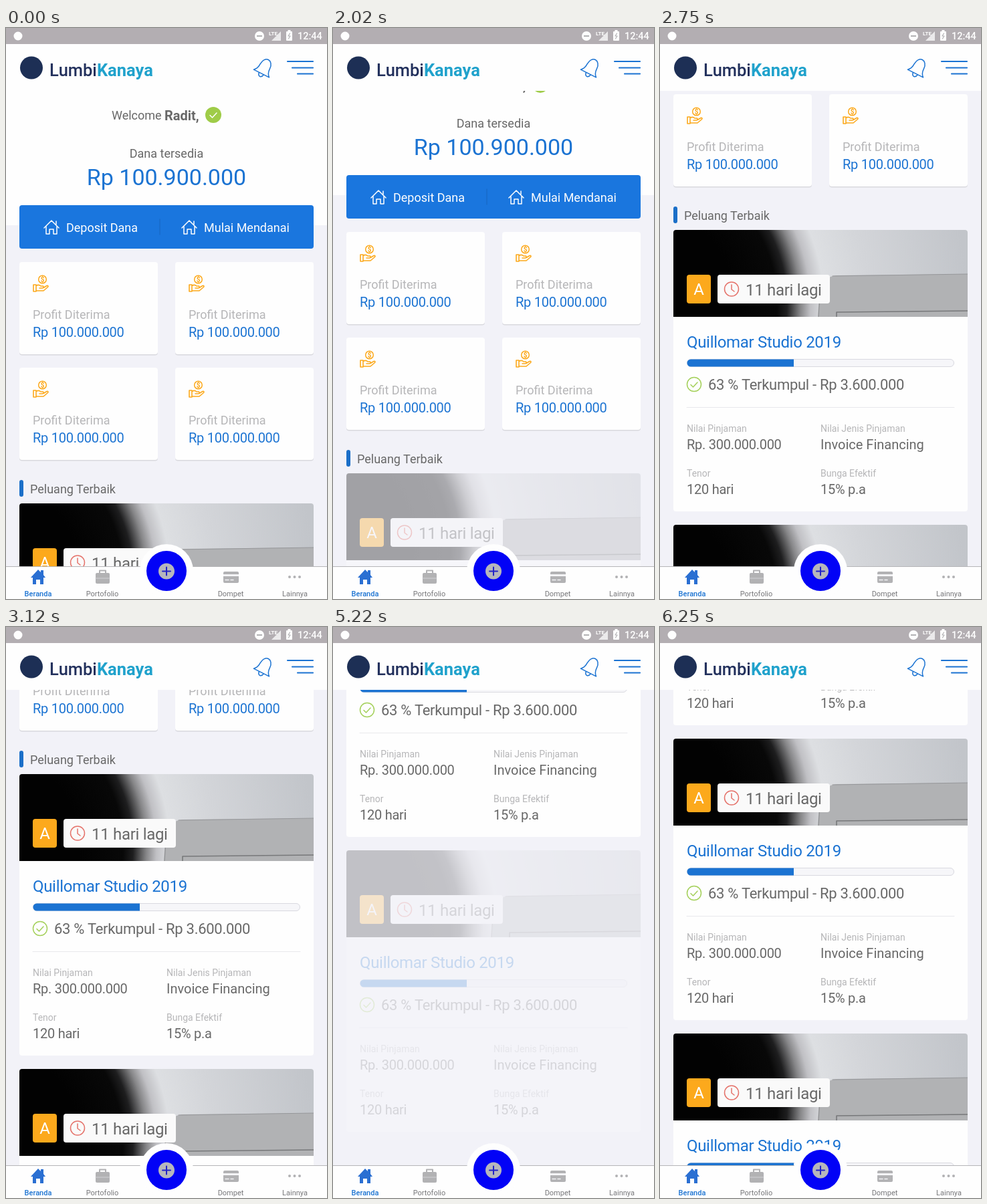
An HTML page that plays this animation: 480 by 854 pixels, repeating every 8 s.

```html
<!DOCTYPE html>
<html lang="id">
<head>
<meta charset="utf-8">
<title>Beranda</title>
<style>
  html, body { margin: 0; width: 100%; height: 100%; overflow: hidden; background: #fff; }
  svg { display: block; width: 480px; height: 854px; font-family: Roboto, sans-serif; }
  .num { letter-spacing: -.013em; }
</style>
</head>
<body>
<svg id="stage" viewBox="0 0 480 854" xmlns="http://www.w3.org/2000/svg"></svg>
<script>
const BLUE = '#1b73d2', INK = '#686868', PALE = '#b6b6b8', PAPER = '#fefefe',
      PAGE = '#f2f2f8', AMBER = '#fca91c', GREY = '#b2b2b4', GREEN = '#a4d05a';
const LOOP = 8000, PITCH = 441;

// Drawing helpers
const text = (x, y, size, fill, str, extra = '') =>
  `<text x="${x}" y="${y}" font-size="${size}" fill="${fill}" ${extra}>${str}</text>`;
const rect = (x, y, w, h, fill, r = 0, extra = '') =>
  `<rect x="${x}" y="${y}" width="${w}" height="${h}" rx="${r}" fill="${fill}" ${extra}/>`;
const disc = (x, y, r, fill) => `<circle cx="${x}" cy="${y}" r="${r}" fill="${fill}"/>`;
const line = (d, stroke, w = 1.5) =>
  `<path d="${d}" fill="none" stroke="${stroke}" stroke-width="${w}" stroke-linecap="round" stroke-linejoin="round"/>`;
const at = (x, y, body, extra = '') => `<g transform="translate(${x} ${y}) ${extra}">${body}</g>`;
const ring = (x, y, r, stroke) => `<circle cx="${x}" cy="${y}" r="${r}" fill="none" stroke="${stroke}" stroke-width="1.5"/>`;
const MID = 'text-anchor="middle"', NUM = 'class="num"';

const house = (x, y) => at(x, y, line('M-11 1L0-10 11 1M-8-1V10H-3V3H3V10H8V-1M7-4V-9', PAPER));

const handCoin = at(20, 20,
  ring(14.5, 6, 5.8, AMBER) +
  text(14.5, 9.6, 10, AMBER, '$', MID + ' font-weight="700"') +
  line('M1 14H5V24H1ZM5 15.5Q9 13 12 16H15.5Q17 18 14.5 19H10M16 18.5L21 15.5Q24 15 22.5 17.5L16 23H5', AMBER, 1.6));

const profitCard = (x, y) => at(x, y,
  rect(0, 1.5, 207, 138, '#d9d9de', 4) + rect(0, 0, 207, 138, PAPER, 4) + handCoin +
  text(20, 85, 18, PALE, 'Profit Diterima') +
  text(20, 112, 20, BLUE, 'Rp 100.000.000', NUM));

const photo = `<g clip-path="url(#photoClip)">
  ${rect(20, 0, 440, 130, 'url(#glow)')}
  <path d="M236 130L239 82Q250 69 264 68L460 66V130Z" fill="#b1b2b4"/>
  ${line('M258 69L460 66', '#96979a', 1)}
  ${line('M264 130V123L460 121', '#77787a', 1.6)}
  ${line('M237 130L239 100', '#8b8c8e', 1)}</g>`;

const field = (x, y, label, value, extra) =>
  text(x, y, 14, PALE, label) + text(x, y + 26, 20, INK, value, extra);

const loanCard = i => `<g class="loan" transform="translate(0 ${711 + PITCH * i})">
  ${rect(20, 0, 440, 421, PAPER, 4)}${photo}
  ${rect(40, 67, 36, 43, AMBER, 4)}${text(58, 97, 24, PAPER, 'A', MID)}
  ${rect(86, 67, 168, 43, '#fafafa', 4)}${ring(107, 88.5, 10.5, '#e5736b')}${line('M107 82V89L111 92', '#e5736b')}
  ${text(128, 98, 24, INK, '11 hari lagi', NUM)}
  ${text(40, 176, 24, BLUE, 'Quillomar Studio 2019', NUM)}
  ${rect(40.5, 193.5, 399, 11, '#f6f6f9', 5.5, 'stroke="#d9d9e0"')}
  <path d="M200 193.5H46a5.5 5.5 0 0 0 0 11H200Z" fill="${BLUE}"/>
  ${ring(51, 231, 10.5, GREEN)}${line('M46 231.5L49.5 235 56 228', GREEN)}
  ${text(72, 239, 22, INK, '63 % Terkumpul - Rp 3.600.000', NUM)}
  ${line('M40 265.5H440', '#e8e8ec', 1)}
  ${field(40, 302, 'Nilai Pinjaman', 'Rp. 300.000.000', NUM)}
  ${field(240, 302, 'Nilai Jenis Pinjaman', 'Invoice Financing')}
  ${field(40, 369, 'Tenor', '120 hari', NUM)}
  ${field(240, 369, 'Bunga Efektif', '15% p.a', NUM)}</g>`;

const content =
  rect(0, 0, 480, 295, PAPER) +
  text(158, 137, 18, INK, 'Welcome') +
  text(237, 138, 20, INK, 'Radit,', 'font-weight="700"') +
  disc(310, 130, 12, '#9fcc48') + line('M305 130.5L308.5 134 315 127', PAPER) +
  text(240, 194, 18, INK, 'Dana tersedia', MID) +
  text(240, 235, 34, BLUE, 'Rp 100.900.000', MID) +
  rect(20, 265, 440, 65, '#1a76de', 4) + line('M230 286V309', '#1764bf', 1) +
  house(68, 298) + text(90, 305, 18, PAPER, 'Deposit Dana') +
  house(274, 298) + text(296, 305, 18, PAPER, 'Mulai Mendanai') +
  [350, 508].map(y => profitCard(20, y) + profitCard(253, y)).join('') +
  rect(20, 676, 6, 25, '#1b6fc8', 3) + text(36, 696, 18, INK, 'Peluang Terbaik') +
  [0, 1, 2].map(loanCard).join('');

const statusBar = rect(0, 0, 480, 24, '#b3aeb2') +
  disc(18, 12, 6.5, PAPER) +
  disc(379, 12, 7, PAPER) + rect(375, 11, 8, 2, GREY) +
  text(393, 11, 8, PAPER, 'LTE', 'font-weight="700"') +
  `<path d="M411 5V19H397Z" fill="${PAPER}" opacity=".75"/>` +
  rect(419, 5, 9, 14, PAPER, 1) + rect(421.5, 3, 4, 3, PAPER) + line('M424.5 8L422 12H425L422.5 16', GREY, 1.2) +
  text(436, 17, 14.5, PAPER, '12:44', 'font-weight="500"');

const header = rect(0, 24, 480, 70, PAPER) +
  disc(38, 59.5, 17, '#1d2f55') +
  text(65, 72, 25.5, '#22305c', '<tspan font-weight="500">Lumbi</tspan><tspan font-weight="700" fill="#20a2cc">Kanaya</tspan>') +
  at(386, 60, line('M-13 9Q-8 5-8-3C-8-10-4-14 0-14S8-10 8-3Q8 5 13 9ZM-4 9Q-3 14 0 14T4 9', BLUE), 'rotate(27)') +
  line('M421 50H459M428 59.5H459M436 68.5H459', BLUE, 2.2);

const tab = (x, label, fill = '#77777a', weight = 400) =>
  text(x, 850, 11, fill, label, `${MID} font-weight="${weight}"`);

const navBar = rect(0, 805, 480, 49, PAPER) + line('M0 805.5H480', '#b5b5b8', 1) +
  disc(240, 812, 40, PAPER) + disc(240, 812, 30, '#0202f6') +
  disc(240, 812.5, 12, '#b6b6bc') + line('M234 812.5H246M240 806.5V818.5', '#2222c8', 2) +
  at(48, 821, `<path d="M-11 1L0-11 4-7V-10H8V-3L11 1H8V11H3V4H-3V11H-8V1Z" fill="#2a6fd2"/>`) +
  rect(134, 815, 21, 16, GREY, 2) + line('M140 815V811.5H149V815', GREY, 2) + line('M134 823H155', '#d2d2d6', 1) +
  rect(325, 813, 23, 17, GREY, 2) + rect(325, 817, 23, 3, '#f4f4f6') + line('M328 825.5H333M336 825.5H340', '#f4f4f6') +
  [424, 431.5, 439].map(x => disc(x, 821, 2, GREY)).join('') +
  tab(48, 'Beranda', BLUE, 500) + tab(144, 'Portofolio') + tab(336, 'Dompet') + tab(432, 'Lainnya');

const stage = document.getElementById('stage');
stage.innerHTML = `<defs>
  <clipPath id="view"><rect y="94" width="480" height="712"/></clipPath>
  <clipPath id="photoClip"><path d="M20 130V4a4 4 0 0 1 4-4H456a4 4 0 0 1 4 4V130Z"/></clipPath>
  <radialGradient id="glow" gradientUnits="userSpaceOnUse" cx="-40" cy="110" r="500">
    <stop offset=".3" stop-color="#020202"/><stop offset=".43" stop-color="#080808"/>
    <stop offset=".46" stop-color="#1e1e1f"/><stop offset=".5" stop-color="#868688"/>
    <stop offset=".53" stop-color="#c0c0c4"/><stop offset=".57" stop-color="#dddfe2"/>
    <stop offset=".7" stop-color="#d3d5d9"/><stop offset="1" stop-color="#c2c5ca"/>
  </radialGradient></defs>
  ${rect(0, 0, 480, 854, PAGE)}
  <g clip-path="url(#view)"><g id="list">${content}</g></g>
  ${header}${statusBar}${navBar}`;

// [time, scroll offset]: a drag, a fast fling into the end of the list, a drag back
const SCROLL = [
  [0, 0], [1920, 0], [2020, 45], [2470, 214], [2640, 345], [2820, 436], [3120, 491],
  [3430, 491], [3600, 730], [3780, 1197], [3815, 1259],
  [5220, 1259], [5400, 1215], [5600, 1115], [5850, 1025], [6040, 996], [6250, 985], [LOOP, 985]
];
// [time, card index]: a touched card dims, then fades back once the drag begins
const TOUCHES = [[1930, 0], [3450, 1], [5220, 2]];

const slope = i => {
  const [a, b] = [SCROLL[i], SCROLL[i + 1]];
  return a && b ? (b[1] - a[1]) / (b[0] - a[0]) : 0;
};
const tangent = i => {
  const a = slope(i - 1), b = slope(i);
  return a * b > 0 ? 2 * a * b / (a + b) : 0;
};

function scrollAt(t) {
  let i = 0;
  while (i < SCROLL.length - 2 && t >= SCROLL[i + 1][0]) i++;
  const [t0, y0] = SCROLL[i], [t1, y1] = SCROLL[i + 1];
  const d = t1 - t0, u = (t - t0) / d, v = 1 - u;
  return y0 * (1 + 2 * u) * v * v + y1 * u * u * (3 - 2 * u) +
    d * u * v * (tangent(i) * v - tangent(i + 1) * u);
}

const easeInOut = u => u < .5 ? 2 * u * u : 1 - 2 * (1 - u) * (1 - u);

function opacityAt(t, card) {
  const touch = TOUCHES.find(([start, i]) => i === card && t >= start && t < start + 240);
  if (!touch) return 1;
  return .2 + .8 * easeInOut(Math.max(0, (t - touch[0] - 30) / 210));
}

const list = document.getElementById('list');
const loans = [...document.querySelectorAll('.loan')];

function draw() {
  const t = performance.now() % LOOP;
  list.setAttribute('transform', `translate(0 ${-Math.round(scrollAt(t))})`);
  loans.forEach((el, i) => el.setAttribute('opacity', opacityAt(t, i)));
  requestAnimationFrame(draw);
}
draw();
</script>
</body>
</html>
```
